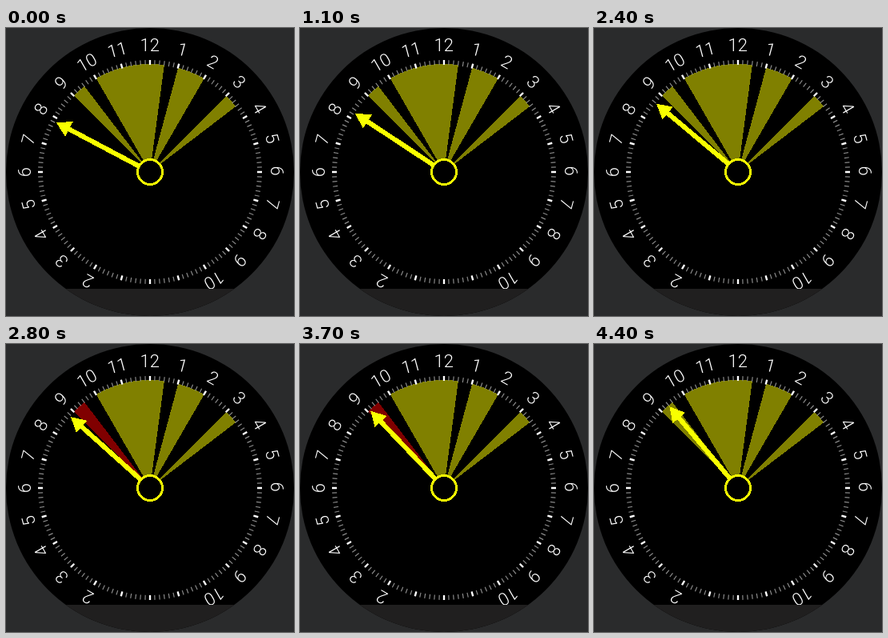
Animation, 360 px wide and 360 px high, one loop 4500 ms. Source, as an HTML page:

```html
<!DOCTYPE html>
<html lang="en">
<head>
<meta charset="utf-8">
<title>24-hour dial</title>
<style>
html, body { margin: 0; width: 100%; height: 100%; overflow: hidden; background: #2a2b2c; }
svg { display: block; width: 100vw; height: 100vh; }
text { font: 300 22px Roboto, sans-serif; fill: #fff; text-anchor: middle; }
#wedges { fill: #808000; }
#wedges, #hand, #hub { shape-rendering: crispEdges; }
.ticks { fill: none; stroke-width: 6; }
</style>
</head>
<body>
<svg viewBox="-180 -180 360 360">
  <clipPath id="face"><circle r="180"/></clipPath>
  <g clip-path="url(#face)">
    <rect x="-180" y="-180" width="360" height="360"/>
    <g id="wedges" transform="rotate(.1)"></g>
    <circle class="ticks" r="137" pathLength="360" stroke="#888" stroke-dasharray=".5 2" transform="rotate(-90.25)"/>
    <circle class="ticks" r="137" pathLength="360" stroke="#fff" stroke-dasharray="1 14" transform="rotate(-90.5)"/>
    <g id="hours" transform="translate(.5 -.6)"></g>
    <rect x="-180" y="146" width="360" height="34" fill="#201f1f"/>
  </g>
  <path id="hand" fill="#f8ff00" d="M0-133L10.3-114.5H3V-14H-3V-114.5H-10.3Z"/>
  <circle id="hub" r="15.5" stroke="#f8ff00" stroke-width="3"/>
</svg>
<script>
const STEP = 100, STEPS = 45;
const $ = id => document.getElementById(id);

function point(deg, r) {
  const a = deg * Math.PI / 180;
  return `${r * Math.sin(a)} ${-r * Math.cos(a)}`;
}

// Busy periods as clock angles, 15 degrees per hour from noon
const busy = [[-45, -37.5], [-30, 7.5], [15, 30], [45, 52.5]];
$('wedges').innerHTML = busy.map(([a, b]) =>
  `<path d="M0 0L${point(a, 135)}A135 135 0 0 1 ${point(b, 135)}Z"/>`).join('');

let labels = '';
for (let h = -10; h <= 10; h++) {
  labels += `<text x="-.7" y="-150" transform="rotate(${h * 15})">${(h + 12) % 12 || 12}</text>`;
}
$('hours').innerHTML = labels;

const firstWedge = $('wedges').firstChild;

function draw() {
  const step = Math.floor(performance.now() / STEP) % STEPS;
  $('hand').setAttribute('transform', `rotate(${-62.1 + step / 2})`);
  firstWedge.setAttribute('fill', step >= 27 && step < 42 ? '#800000' : '#808000');
  requestAnimationFrame(draw);
}
draw();
</script>
</body>
</html>
```
